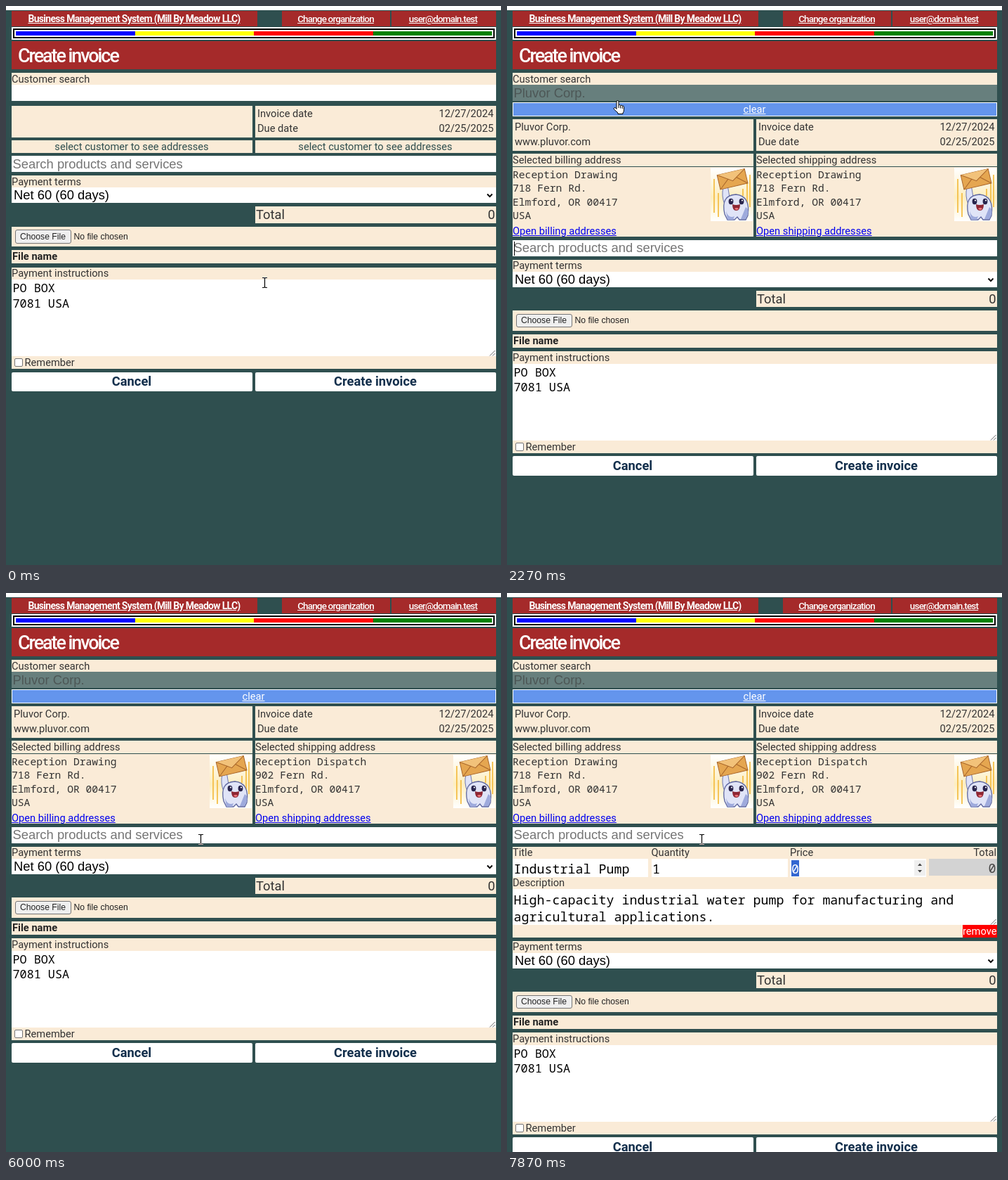
Write an HTML page that moves like this. It is 705 px wide and 795 px high and loops after 8 s.

```html
<!DOCTYPE html>
<html lang="en">
<head>
<meta charset="utf-8">
<title>Create invoice</title>
<style>
  html, body { margin: 0; width: 100%; height: 100%; overflow: hidden; background: #2f4f4f; }
  #stage { position: absolute; left: 0; top: 0; width: 705px; height: 795px; overflow: hidden; background: #2f4f4f; }
  #stage div, #stage svg { position: absolute; box-sizing: border-box; }
  #stage [hidden] { display: none; }
  .group { left: 0; top: 0; width: 705px; height: 0; }
  .text { font: 14.67px/20px Roboto, sans-serif; color: #333; white-space: pre; }
  .paper { background: #faebd7; }
  .brown { background: #a52a2a; }
  .white { background: #fff; }
  .frame { background: #fff; border: 2px solid #000; outline: 2px solid #fff; }
  .narrow { color: #fff; font-size: 13.5px; font-weight: 500; letter-spacing: -.85px; text-decoration: underline; }
  .brand { font-size: 14px; font-weight: 700; letter-spacing: -.7px; }
  .title { color: #fff; font-size: 27px; font-weight: 500; letter-spacing: -2.1px; }
  .slate { color: #2f4f4f; }
  .bold { font-weight: 700; color: #222; }
  .big { font-size: 18.33px; }
  .arial { font-family: "Liberation Sans", Arial, sans-serif; font-size: 18.4px; color: #000; }
  .faint { color: #757575; }
  .small { font-size: 12.2px; color: #222; }
  .mono { font-family: "Roboto Mono", "Noto Sans Mono", monospace; line-height: 19.35px; }
  .note { font-family: "Noto Sans Mono", monospace; font-size: 16.8px; font-weight: 500; line-height: 21.3px; color: #000; }
  .field { font-size: 18.33px; line-height: 23.5px; color: #000; }
  .picked { background: #3367d1; color: #fff; }
  .link { color: #00e; text-decoration: underline; }
  .visited { color: #551a8b; }
  .link.press, .visited.press { color: #f00; }
  .action { font-size: 18.33px; font-weight: 700; color: #132f4c; }
  .light { color: #fff; }
  .locked { background: #677f7d; }
  .locked-text { color: #4d5756; }
  .clear { background: #6495ed; border: 1px solid #fff; }
  .choice { background: #faebd7; border: 2px solid #1e90ff; border-width: 2px 18px 2px 4px; }
  .upright { writing-mode: vertical-rl; color: #fff; font-weight: 500; }
  .menu { background: #000; box-shadow: 7px 7px 5px #000; }
  .menu .text { color: #fff; font-weight: 500; }
  .caret { background: #000; }
  #beam { mix-blend-mode: difference; }
</style>
</head>
<body>
<div id="stage"></div>
<script>
const stage = document.getElementById('stage');
const LOOP = 8000, STEP = 200 / 3, LINE = 19.35;

function box(parent, x, y, w, h, cls = '') {
  const e = document.createElement('div');
  e.className = cls;
  e.style.cssText = `left:${x}px;top:${y}px;width:${w}px;height:${h}px`;
  parent.append(e);
  return e;
}

// cy is the middle of the first line; align is 0 left, .5 centre, 1 right
function text(parent, x, cy, str, cls = '', align = 0) {
  const e = document.createElement('div');
  e.className = 'text ' + cls;
  e.textContent = str;
  parent.append(e);
  const half = parseFloat(getComputedStyle(e).lineHeight) / 2;
  e.style.left = x + 'px';
  e.style.top = cy - half + 'px';
  if (align) e.style.transform = `translateX(${-100 * align}%)`;
  return e;
}

function svg(parent, x, y, w, h, body) {
  parent.insertAdjacentHTML('beforeend',
    `<svg style="left:${x}px;top:${y}px" width="${w}" height="${h}" viewBox="0 0 ${w} ${h}">${body}</svg>`);
  return parent.lastElementChild;
}

const group = () => box(stage, 0, 0, 705, 0, 'group');
const show = (e, on) => { e.hidden = !on; };
const grip = (parent, y) => svg(parent, 688, y, 9, 9, '<path d="M1 8.5L8.5 1M5 8.5L8.5 5" stroke="#666" fill="none"/>');

const company = 'Pluvor Corp.';
const town = '\nElmford, OR 00417\nUSA';
const home = 'Reception Drawing\n718 Fern Rd.' + town;
const depot = 'Reception Dispatch\n902 Fern Rd.' + town;

// Page header
box(stage, 0, 0, 705, 6, 'white');
box(stage, 8, 7, 350, 22, 'brown');
box(stage, 393, 7, 154, 22, 'brown');
box(stage, 549, 7, 149, 22, 'brown');
text(stage, 182.5, 18, 'Business Management System (Mill By Meadow LLC)', 'narrow brand', .5);
text(stage, 469.5, 18, 'Change organization', 'narrow', .5);
text(stage, 622.5, 18, 'user@domain.test', 'narrow', .5);
box(stage, 10, 32, 686, 14, 'frame');
['blue', 'yellow', 'red', 'green'].forEach((c, i) => {
  box(stage, 14 + 169.5 * i, 36, 169.5, 6).style.background = c;
});
box(stage, 8, 50, 690, 40, 'brown');
text(stage, 17, 71, 'Create invoice', 'title');

// Customer search
box(stage, 8, 95, 690, 17, 'paper');
text(stage, 8, 103.5, 'Customer search');
const customer = box(stage, 8, 112, 690, 23, 'white');
const customerText = text(stage, 9.5, 123.5, '', 'arial');
const customerCaret = box(stage, 10, 114, 1, 20, 'caret');
const clear = group();
box(clear, 8, 137, 690, 20, 'clear');
text(clear, 352.5, 147, 'clear', 'light link', .5).style.color = '#fff';

// Customer and date panels
const dates = group();
box(dates, 8, 141.5, 342.5, 45, 'paper');
box(dates, 355, 141.5, 343, 45, 'paper');
text(dates, 358, 153, 'Invoice date');
text(dates, 358, 174, 'Due date');
text(dates, 694.5, 153, '12/27/2024', '', 1);
text(dates, 694.5, 174, '02/25/2025', '', 1);
const details = group();
text(details, 11, 172, company);
text(details, 11, 193, 'www.pluvor.com');

const noAddress = group();
for (const [x, mid] of [[8, 179], [355, 526]]) {
  box(noAddress, x, 191, x < 9 ? 342.5 : 343, 18, 'paper');
  text(noAddress, mid, 200, 'select customer to see addresses', 'slate', .5);
}

// Selected addresses
const mascot = `
  <defs><linearGradient id="glow" x2="0" y2="1"><stop stop-color="#fff"/><stop offset=".55" stop-color="#fdeec0"/><stop offset="1" stop-color="#fff"/></linearGradient></defs>
  <path d="M0 0h60v76H0z" fill="url(#glow)"/>
  <path d="M5 16v48M11 36v34M52 22v42M56 10v46M46 30v10" stroke="#f4bf4a" stroke-width="1.8"/>
  <path d="M20 52q-5-12-2-24q6-3 7 2l2 12z" fill="#dfe3f7" stroke="#6f78b0"/>
  <path d="M20 66q-6-27 16-28q21 2 17 30l-3 6h-9l-3-4-4 4h-10z" fill="#e0e4f7" stroke="#5d669f" stroke-width="1.3"/>
  <path d="M22 62q4 11 12 7l-2 5h-8zM50 56q5 3 3 10l-3 7h-7z" fill="#9eaadc"/>
  <g transform="rotate(-13 30 16)"><path d="M11 6h40v21H11z" fill="#e5a650" stroke="#a9662a"/><path d="M11 6l20 13L51 6M11 27l14-12M51 27L37 15" fill="#f2c27a" stroke="#a9662a"/></g>
  <ellipse cx="29" cy="48" rx="3.4" ry="4.2" fill="#28244c"/><ellipse cx="44" cy="48" rx="3.4" ry="4.2" fill="#28244c"/>
  <circle cx="30" cy="46.5" r="1.1" fill="#fff"/><circle cx="45" cy="46.5" r="1.1" fill="#fff"/>
  <path d="M31 52q5 2 11 0q0 9-5.500 9t-5.500-9z" fill="#8d2633"/><path d="M34 58q3-2 6 0q-3 4-6 0z" fill="#f0767a"/>`;
const addresses = group();
const panels = [], lines = [], openers = [];
[[8, 342.5, 'billing'], [355, 343, 'shipping']].forEach(([x, w, kind], i) => {
  panels[i] = box(addresses, x, 210, w, 118, 'paper');
  text(addresses, x, 219, `Selected ${kind} address`);
  box(addresses, x, 228, w, 1).style.background = '#2f4f4f';
  lines[i] = text(addresses, x, 239.5, home, 'mono');
  svg(addresses, x + 282, 230, 60, 76, mascot);
  openers[i] = text(addresses, x, 319.5, `Open ${kind} addresses`, 'link');
});
const choices = group();
const options = [[313, home], [398.5, depot]].map(([y, str]) => {
  box(choices, 357, y, 339, 80.5, 'choice');
  const side = text(choices, 677, y + 10, 'select', 'upright');
  side.style.top = y + 20 + 'px';
  return text(choices, 361, y + 12, str, 'mono visited');
});
text(choices, 355, 492, 'Close addresses', 'link');

// Product search
const search = group();
box(search, 8, 213, 690, 23, 'white');
const searchHint = text(search, 9.5, 224.5, 'Search products and services', 'arial faint');
const searchText = text(search, 9.5, 224.5, '', 'arial');
const searchCaret = box(search, 10, 215, 1, 20, 'caret');

// Invoice line
const item = group();
box(item, 8, 361, 690, 129, 'paper');
[[8, 'Title'], [205.5, 'Quantity'], [403, 'Price']].forEach(([x, label]) => {
  text(item, x, 369, label);
  box(item, x, 378, x < 9 ? 193 : 194, 26, 'white');
});
text(item, 697, 369, 'Total', '', 1);
box(item, 601, 378, 96.5, 24).style.background = '#d3d3d3';
text(item, 696.5, 391, '0', 'mono field', 1).style.color = '#444';
const fields = [[9.5, 'Industrial Pump'], [207, '1'], [405, '0']]
  .map(([x, str]) => text(item, x, 391.5, str, 'mono field'));
const spinner = svg(item, 580, 380, 16, 22,
  '<path d="M0 0h16v22H0z" fill="#efefef"/><path d="M5 8l3-3.5L11 8zM5 14l3 3.5 3-3.5z" fill="#444"/>');
text(item, 8, 412, 'Description');
box(item, 8, 421, 690, 51, 'white');
text(item, 9.5, 436, 'High-capacity industrial water pump for manufacturing and\nagricultural applications.', 'mono field').style.lineHeight = '24px';
grip(item, 463);
box(item, 648.5, 472, 49, 17.5).style.background = '#f00';
text(item, 697.5, 481, 'remove', 'light', 1);

// Rest of the form
const rest = group();
box(rest, 8, 241, 690, 17, 'paper');
text(rest, 8, 249.5, 'Payment terms');
box(rest, 8, 258, 690, 22, 'white');
text(rest, 11, 269, 'Net 60 (60 days)', 'arial');
svg(rest, 684, 266, 10, 8, '<path d="M1.5 1.5L5 5.2l3.500-3.700" stroke="#000" stroke-width="1.9" fill="none"/>');
box(rest, 355, 285, 343, 23.5, 'paper');
text(rest, 356, 297, 'Total', 'big');
text(rest, 696.5, 297, '0', 'big', 1);
box(rest, 8, 313.5, 690, 28.5, 'paper');
box(rest, 13, 318, 79.5, 19.5).style.cssText += ';background:#efefef;border:1px solid #767676;border-radius:3px';
text(rest, 52.5, 327.5, 'Choose File', 'arial small', .5);
text(rest, 96.5, 327.5, 'No file chosen', 'arial small');
box(rest, 8, 347, 690, 19, 'paper');
text(rest, 9, 356, 'File name', 'bold');
box(rest, 8, 371.5, 690, 144.5, 'paper');
text(rest, 8, 380, 'Payment instructions');
box(rest, 8, 389, 690, 109, 'white');
text(rest, 9.5, 401, 'PO BOX\n7081 USA', 'note');
grip(rest, 489);
box(rest, 12, 501, 12, 12).style.cssText += ';background:#fff;border:1px solid #767676;border-radius:2px';
text(rest, 26.5, 507, 'Remember');
box(rest, 8, 520.5, 342.5, 27.5, 'white').style.borderRadius = '2px';
box(rest, 355, 520.5, 343, 27.5, 'white').style.borderRadius = '2px';
text(rest, 179, 534, 'Cancel', 'action', .5);
text(rest, 526, 534, 'Create invoice', 'action', .5);

// Suggestion menu
const menu = box(stage, 8, 137, 690, 29, 'menu');
const menuText = text(menu, 4, 15, '', 'mono');
const menuMark = box(menu, 4, 6, 9, 18, 'white');
const products = ['Industrial Pump', 'CNC Milling Machine', 'Machine Maintenance',
  'Consulting Services', 'Installation Services', 'Training Services', 'Hydraulic Press'];

// Pointer
const beam = svg(stage, 0, 0, 9, 17, '<path d="M1 1.500h2.500l1 1 1-1H8M4.500 2v13M1 15.500h2.500l1-1 1 1H8" stroke="#fff" stroke-width="1.200" fill="none"/>');
beam.id = 'beam';
const hand = svg(stage, 0, 0, 17, 21, '<path d="M5 12V2q0-1.500 1.500-1.500T8 2v5q2-1.200 2.600.5 2-1 2.600.6 2.300-.6 2.300 1.700v4q0 3-1.500 4.200v1.500H7v-1.500L1.500 13q-1-2 .5-2.500t3 2z" fill="#fff" stroke="#000"/><path d="M8 7v4M10.600 8v3.500M13.200 8.500V12" stroke="#000"/>');

// start, end, target point
const moves = [
  [0, 400, 158, 134.5],
  [2930, 3400, 374, 313],
  [3600, 4270, 397, 427],
  [4930, 5400, 277, 350]
];

function pointer(t) {
  let x = 368, y = 393;
  for (const [from, to, tx, ty] of moves) {
    const u = Math.min(1, Math.max(0, (t - from) / (to - from)));
    const k = u * u * (3 - 2 * u);
    x += (tx - x) * k;
    y += (ty - y) * k;
  }
  return [x, y];
}

function render(t) {
  const within = (a, b) => t >= a && t < b;
  const chosen = t >= 2270, open = within(3670, 4400), added = t >= 6930;
  const menuUp = within(1400, 2270) || within(6200, 6930);

  customer.className = chosen ? 'locked' : 'white';
  customerText.textContent = chosen ? company : t < 1400 ? '' : t < 1730 ? 'p' : 'pl';
  customerText.classList.toggle('locked-text', chosen);
  customerCaret.style.left = (t < 1400 ? 10 : t < 1730 ? 20 : 24) + 'px';
  show(customerCaret, within(470, 1000) || within(1400, 2270));

  const typed = !within(6200, 6930) ? '' : 'indu'.slice(0, t < 6400 ? 1 : t < 6600 ? 2 : t < 6730 ? 3 : 4);
  searchText.textContent = typed;
  show(searchHint, !typed);
  searchCaret.style.left = [10, 14, 24, 34, 44][typed.length] + 'px';
  show(searchCaret, within(2270, 2800) || within(3330, 3600) || within(5470, 6000) || typed);

  const names = !typed ? [company] : products.slice(0, [0, 7, 6, 1, 1][typed.length]);
  show(menu, menuUp);
  menu.style.top = (chosen ? 356 : 137) + 'px';
  menu.style.height = 9.5 + LINE * names.length + 'px';
  menuText.textContent = '  ' + names.join('\n');
  show(menuMark, within(1870, 2270) || t >= 6730);

  const menuRoom = menuUp ? 13.6 + LINE * names.length : 0;
  const above = chosen ? 119.5 + (open ? 173 : 0) : menuRoom;
  dates.style.top = (chosen ? 19 : menuRoom) + 'px';
  noAddress.style.top = menuRoom + 'px';
  search.style.top = above + 'px';
  rest.style.top = above + (chosen ? menuRoom : 0) + (added ? 134 : 0) + 'px';

  show(clear, chosen);
  show(details, chosen);
  show(noAddress, !chosen);
  show(addresses, chosen);
  show(choices, open);
  show(openers[1], !open);
  for (const p of panels) p.style.height = (open ? 291 : 118) + 'px';
  lines[1].textContent = t < 4400 ? home : depot;
  openers[1].classList.toggle('press', within(3600, 3670));
  options[1].classList.toggle('press', within(4330, 4400));

  show(item, added);
  const focus = t < 7730 ? 0 : t < 7870 ? 1 : 2;
  fields.forEach((f, i) => f.classList.toggle('picked', i === focus));
  spinner.style.display = focus === 2 ? '' : 'none';

  const [x, y] = pointer(Math.floor((t + 4) / STEP) * STEP);
  const onLink = within(2270, 4400) && (y < 157 || y > 311);
  beam.style.display = onLink ? 'none' : '';
  hand.style.display = onLink ? '' : 'none';
  beam.style.left = Math.round(x) - 4 + 'px';
  beam.style.top = Math.round(y) - 8 + 'px';
  hand.style.left = Math.round(x) - 7 + 'px';
  hand.style.top = Math.round(y) - 1 + 'px';
}

const start = performance.now();
function tick() {
  render((performance.now() - start) % LOOP);
  requestAnimationFrame(tick);
}
tick();
</script>
</body>
</html>
```
